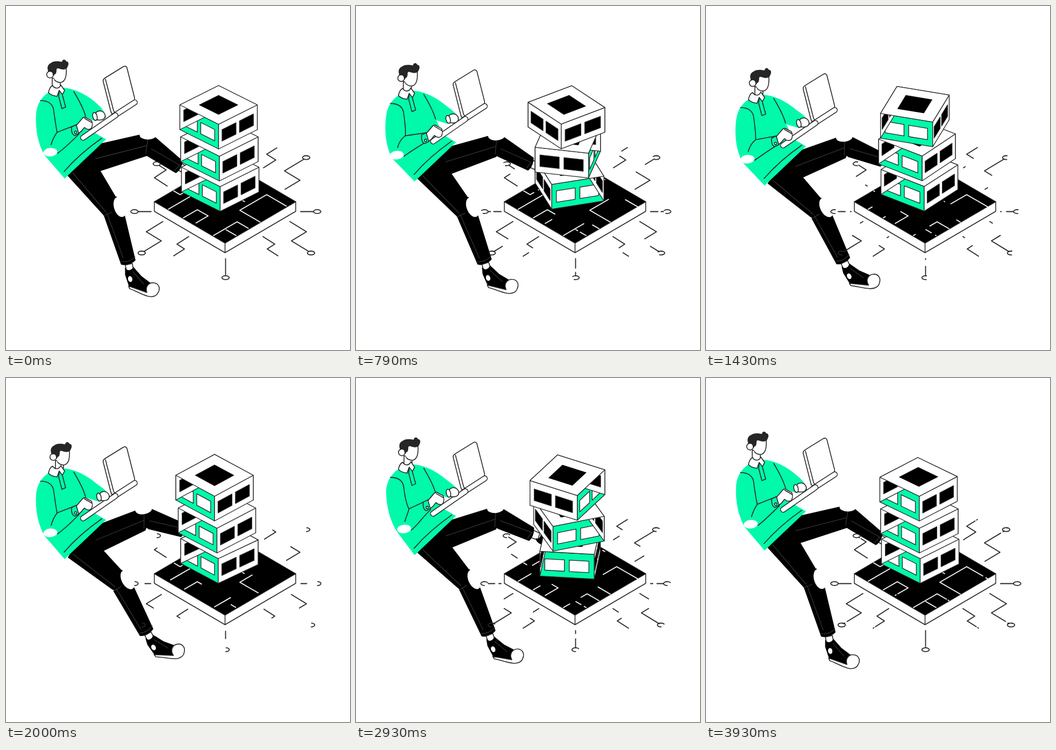
Animation of 640x640 px, one loop 4 s. Source, as an HTML page with a canvas:

```html
<!DOCTYPE html>
<html lang="en">
<head>
<meta charset="utf-8">
<style>
html, body { margin: 0; width: 100%; height: 100%; overflow: hidden; background: #fff; }
canvas { display: block; }
</style>
</head>
<body>
<canvas id="stage" width="640" height="640"></canvas>
<script>
const ctx = document.getElementById('stage').getContext('2d');
const INK = '#262626', GREEN = '#00faaa', SEAM = '#333', TAU = Math.PI * 2;
const SIDES = [0, 1, 2, 3];
let t, sink, wave; // seconds in the loop, body drop 0..1, sideways swing -1..1

ctx.lineJoin = ctx.lineCap = 'round';

function draw(path, fill, stroke, width = 1.6) {
  const shape = new Path2D(path);
  if (fill) { ctx.fillStyle = fill; ctx.fill(shape); }
  if (stroke) { ctx.strokeStyle = stroke; ctx.lineWidth = width; ctx.stroke(shape); }
}

function ellipse(x, y, rx, ry, stroke, turn = 0) {
  const shape = new Path2D();
  shape.ellipse(x, y, rx, ry, turn, 0, TAU);
  draw(shape, '#fff', stroke);
}

function shifted(dx, dy, paint) {
  ctx.save();
  ctx.translate(dx, dy);
  paint();
  ctx.restore();
}

// Moves a joint by (dx, dy) and turns the limb around it as the body sinks.
function hinge(x, y, dx, dy, degrees, paint) {
  shifted(x + dx * sink, y + dy * sink, () => {
    ctx.rotate(degrees * sink * TAU / 360);
    ctx.translate(-x, -y);
    paint();
  });
}

function farLeg() {
  hinge(262, 262, -2, 3, -17, () => {
    draw('M318 304L332 312L338 300L326 292Z', '#fff', INK);
    draw('M329 308C336 313 340 303 339 301L350 300L348 322L338 322C332 318 328 314 329 308Z', '#000');
    draw('M250 239C262 233 272 237 278 244L329 288C328 297 324 306 316 311L262 279L250 262Z', '#000');
    draw('M262 261L323 296L314 306', null, SEAM, 1.3);
  });
  hinge(262, 262, -5, 5, -8, () => {
    draw('M150 262L175 256L250 239L270 240L272 262L262 279L176 307Z', '#000');
    draw('M155 266L167 284L261 260M264 247L260 274M167 284L165 292', null, SEAM, 1.3);
    ellipse(264, 240, 15.5, 8.5);
  });
}

function nearLeg() {
  hinge(113, 314, 2, 20, -12, () => {
    draw('M113 314L182 390L200 400L220 385C216 370 210 362 205 356L176 307L158 262Z', '#000');
    draw('M124 310L188 386', null, SEAM, 1.3);
  });
  hinge(182, 390, 18, 7, -11.3, () => {
    draw('M182 390L205 354C212 362 218 372 220 385L241 473C234 480 224 484 214 481Z', '#000');
    draw('M182 390L197 384M188 386L218 469M214 475C224 478 234 473 240 467', null, SEAM, 1.3);
    ellipse(212, 374, 11, 19, null, -0.3);
  });
  hinge(229, 482, 36, -5, -17, () => {
    draw('M222 482L224 492C230 495 235 492 237 490L235 479Z', '#fff', INK);
    draw('M222 488L222 500L230 524L262 534L262 520L268 515L252 503L237 486C234 492 226 495 222 488Z', '#000', '#000', 1);
    draw('M236 494L256 517', null, SEAM, 1.2);
    draw('M262 533C258 520 268 514 275 515C284 516 288 525 283 533C280 540 272 542 264 540C250 536 240 529 230 526L228 521Z', '#fff', INK);
    ellipse(231, 508, 4, 5.5, null, -0.2);
  });
}

function head() {
  draw('M86 134L86 150C90 155 98 155 101 150L101 138Z', '#fff', INK);
  draw('M88 122L88 130C89 138 97 143 103 142C110 140 113 130 112 115L96 108Z', '#fff');
  draw('M112 115C113 130 110 140 103 142C97 143 92 140 90 137', null, INK);
  ellipse(82, 127.5, 6.3, 6.3, INK);
  draw('M79 123C75 113 79 109 82 107C89 101 99 103 104 104C105 98 111 99 112 103C117 103 117 109 115 112C113 119 106 119 100 117C96 115 94 116 94 119C94 125 92 128 90 127C90 131 87 130 87 128C87 123 84 121 79 123Z', INK);
}

function laptop() {
  draw('M181 141L195 196C196 201 200 203 204 200L237 178C239 176 240 174 239 170L225 115C224 112 221 111 218 113L184 134C181 136 180 138 181 141Z', '#fff', INK);
  draw('M185 136L200 194C201 197 203 199 206 198', null, INK);
  for (const bar of ['M200 205L239.5 179.5', 'M143.5 245L203.5 203.5']) {
    draw(bar, null, INK, 11);
    draw(bar, null, '#fff', 8);
  }
}

function torso() {
  const sway = -7 * wave;
  const reach = 8 * Math.pow(Math.sin(Math.PI * t / 4), 0.4);
  const handX = Math.max(0, -3 * wave), handY = wave > 0 ? 10 * wave : 3 * wave;
  const bendX = 95 + sway / 2, bendY = 235 + handY * 0.1;

  draw(`M80 160C68 168 58 180 56 200C${54 + sway * 0.3} 230 ${60 + sway / 2} 258 ${72 + sway * 0.7} 278L109 321L186 248L162 234L149 206L126 157L106 152Z`, GREEN);
  draw(`M106 152C124 153 142 161 160 174C175 186 ${183 + reach} 194 ${186 + reach} 208L${165 + reach} 214L149 207L120 160Z`, GREEN);
  draw('M126 159C135 174 144 190 148 205M108 308C127 286 151 265 178 246', null, INK);
  draw('M79 161C80 155 83 149 87 148C91 155 99 154 102 147L109 157L105 165L99 157L95 168C88 167 82 165 79 161Z', '#fff', INK);
  draw('M99 159L98 168L104 191L111 188L105 166', null, INK);
  ellipse(82.5 + sway, 272, 13, 8, null, -0.1);
  draw(`M64 176C80 176 88 183 89 196C91 212 93 224 ${bendX} ${bendY}L${131 + handX} ${221 + handY}M${bendX} ${bendY}C${90 + sway} 242 ${86 + sway} 250 ${84 + sway} 258M${96 + sway} 274C${106 + sway} 267 122 252 ${136 + handX} ${238 + handY * 0.7}`, null, INK);

  shifted(0, 1.5 * wave, laptop);
  shifted(handX, handY, () => {
    draw('M131 221L122 225C121 232 123 240 128 241L136 237', GREEN, INK);
    ellipse(129.5, 235, 2, 2.3, INK);
    draw('M131 222L143 208C146 206 149 207 151 209L159 213C161 217 161 223 159 227C156 231 150 230 146 226C142 229 140 236 135 236Z', '#fff', INK);
    draw('M146 209L160 217', null, INK);
  });
  shifted(reach, 0, () => {
    draw('M168 197C175 193 182 196 184 203C185 208 181 212 176 212C169 213 166 211 165 204Z', '#fff', INK);
    ellipse(165, 205.5, 4, 7.5, INK, -0.25);
  });
}

// Strokes the current path except for the gap that travels along it.
function strokeWithGap(length) {
  const from = 0.75 * t - 0.02;
  const to = (t < 2 ? t : 1 + t / 2) + 0.03 * Math.min(1, t * 4, (4 - t) * 4);
  for (let k = -1; k < 4; k++) {
    const a = Math.max(0, to - 1 - k), b = Math.min(1, from - k);
    if (b <= a) continue;
    ctx.setLineDash([(b - a) * length, length * 2]);
    ctx.lineDashOffset = -a * length;
    ctx.stroke();
  }
  ctx.setLineDash([]);
}

// Follows runs that alternate between falling and rising slopes; returns the end.
function route(x, y, slope, ...runs) {
  let length = 0;
  ctx.beginPath();
  ctx.moveTo(x, y);
  for (const run of runs) {
    x += run;
    y += run * slope;
    ctx.lineTo(x, y);
    length += Math.abs(run) * Math.hypot(1, slope);
    slope = -slope;
  }
  strokeWithGap(length);
  return [x, y];
}

function ring(x, y) {
  ctx.beginPath();
  ctx.ellipse(x, y, 6.8, 3.6, 0, -TAU / 4, TAU * 0.75);
  strokeWithGap(33.4);
}

function circuits() {
  ctx.lineWidth = 1.8;
  ctx.strokeStyle = '#fff';
  const iso = 0.58;
  route(312, 344, iso, 12, 21);
  route(302, 378, -iso, 133);
  route(330, 394, -iso, 26, 20, -24);
  route(386, 427, -iso, 44, 22);
  route(428, 427, iso, -19);
  route(473, 402, iso, -38, 50, 39);
  route(444, 364, iso, -19);
  route(463, 323, iso, -23);

  ctx.strokeStyle = INK;
  const wired = (side, ...args) => {
    const [x, y] = route(...args);
    ring(x + side * 3.5, y + Math.sign(y - 372) * 2.5);
  };
  for (const side of [-1, 1]) {
    wired(side, 410 + side * 118, 401, side * 0.61, side * 31, side * -28, side * 33);
    route(409 + side * 69, 429, side * 0.64, side * 22, side * -14, side * 21);
    route(409 + side * 139, 382.5, 0, side * 24);
    ring(409 + side * 170, 382.5);
  }
  wired(1, 519, 341, -0.6, 28, -29, 37);
  wired(-1, 300, 335, 0.65, -24, 22, -14);
  route(479, 301, -0.63, 23, -17, 20);
  ctx.beginPath();
  ctx.moveTo(408.5, 470);
  ctx.lineTo(408.5, 501);
  strokeWithGap(31);
  ring(408.5, 505.5);
}

function board() {
  draw('M276 364L407.5 441L539 364L539 382L407.5 459L276 382ZM407.5 441L407.5 459', '#fff', INK, 1.5);
  draw('M276 364L407.5 287L539 364L407.5 441Z', '#000', INK, 1.3);
  circuits();
}

// cubic-bezier(.2, 0, 0, 1)
function spin(x) {
  if (x <= 0) return 0;
  if (x >= 1) return 1;
  let lo = 0, hi = 1, s;
  for (let i = 0; i < 24; i++) {
    s = (lo + hi) / 2;
    if (0.6 * s * (1 - s) ** 2 + s ** 3 < x) lo = s; else hi = s;
  }
  return s * s * (3 - 2 * s);
}

function polygon(points, fill, stroke) {
  draw('M' + points.map(p => p.join(' ')).join('L') + 'Z', fill, stroke, 1.3);
}

// One storey, turning fully twice per loop; higher ones drift and tilt more.
function storey(level, delay, span) {
  const second = t >= 1.96;
  const p = spin(((second ? t - 1.96 : t) - delay) / span);
  const rise = 1.75 * level * Math.max(0, Math.sin(Math.PI * (t - 1.1) / 2.8));
  const cx = 398.5 - 1.5 * level - (1.5 + 3 * level) * (second ? 1 - p : p);
  const cy = 300 - 55 * level - 1.5 * level * level - rise;
  const height = 46;
  const corner = (i, scale = 1) => {
    const a = TAU * (p + (i + 1) / 4);
    return [cx + 72 * scale * Math.cos(a), cy + (36 + rise) * scale * Math.sin(a)];
  };
  // The green wall is painted first, so the back walls show through it.
  const depth = i => i ? Math.sin(TAU * (p + (i + 1.5) / 4)) : -2;

  for (const i of [...SIDES].sort((a, b) => depth(a) - depth(b))) {
    const [ax, ay] = corner(i), [bx, by] = corner(i + 1);
    const at = (u, v) => [ax + (bx - ax) * u, ay + (by - ay) * u + height * v];
    const pane = (u0, u1, v0, v1) => [at(u0, v0), at(u1, v0), at(u1, v1), at(u0, v1)];
    polygon(pane(0, 1, 0, 1), i ? '#fff' : GREEN, INK);
    for (const u of [0.1, 0.55]) polygon(pane(u, u + 0.36, 0.29, 0.75), i ? '#000' : '#fff', INK);
  }
  polygon(SIDES.map(i => corner(i)), '#fff', INK);
  polygon(SIDES.map(i => corner(i, 0.51)), '#000');
}

function frame(now) {
  t = now / 1000 % 4;
  sink = (1 - Math.cos(TAU * t / 4)) / 2;
  wave = Math.sin(TAU * t / 4);
  ctx.fillStyle = '#fff';
  ctx.fillRect(0, 0, 640, 640);
  farLeg();
  nearLeg();
  shifted(6 * sink, 19.5 * sink, head);
  shifted(0, 16 * sink, torso);
  board();
  storey(0, 0, 1.85);
  storey(1, 0.42, 1.32);
  storey(2, 0.438, 1.69);
  requestAnimationFrame(frame);
}
frame(0);
</script>
</body>
</html>
```
